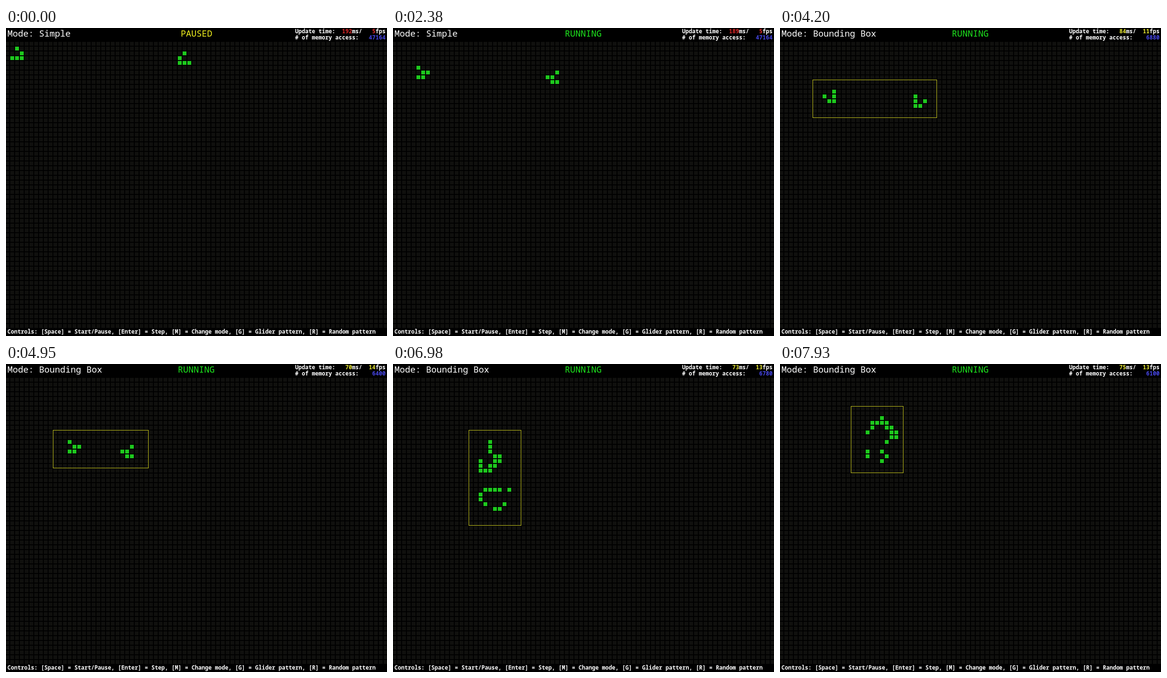
Recreate the animation shown at these times as an HTML page. Size 796 by 644 pixels, loop 8 s.

```html
<!DOCTYPE html>
<html lang="en">
<head>
<meta charset="utf-8">
<title>Game of Life</title>
<style>
  html, body { margin: 0; width: 100%; height: 100%; overflow: hidden; background: #000; }
  svg { display: block; }
  text { font-family: "Noto Sans Mono", "DejaVu Sans Mono", monospace; fill: #fff; white-space: pre; }
  .big { font-size: 18.333px; }
  .small { font-size: 11.667px; font-weight: 700; }
  .end { text-anchor: end; }
</style>
</head>
<body>
<svg width="796" height="644" viewBox="0 0 796 644">
  <defs>
    <pattern id="grid" x="-1" y="29" width="10" height="10" patternUnits="userSpaceOnUse">
      <rect width="8" height="8" fill="#10100e" shape-rendering="crispEdges"/>
    </pattern>
  </defs>
  <rect width="796" height="644" fill="#000"/>
  <rect y="29" width="796" height="598" fill="url(#grid)"/>
  <path id="cells" fill="#1ec81e" shape-rendering="crispEdges"/>
  <rect id="box" fill="none" stroke="#c8c81e"/>
  <text id="mode" class="big" x="3" y="18"></text>
  <text id="state" class="big" y="18"></text>
  <text class="small" x="604" y="11">Update time:</text>
  <text id="ms" class="small end" x="723" y="11"></text>
  <text class="small" x="723" y="11">ms/</text>
  <text id="fps" class="small end" x="772" y="11"></text>
  <text class="small" x="772" y="11">fps</text>
  <text class="small" x="604" y="24"># of memory access:</text>
  <text id="mem" class="small end" x="793" y="24" style="fill:#4646e6"></text>
  <text class="small" x="3" y="639">Controls: [Space] = Start/Pause, [Enter] = Step, [M] = Change mode, [G] = Glider pattern, [R] = Random pattern</text>
</svg>
<script>
const LOOP = 8000, COLS = 80, ROWS = 60, LAST = 101;
const RUN_AT = 370, FIRST_STEP = 500, SLOW = 134;
const BOX_AT = 3630, BOX_GEN = 24, FAST = 56.5;
const el = id => document.getElementById(id);

const cell = (x, y) => y * COLS + x;
const col = key => key % COLS;
const row = key => Math.floor(key / COLS);

function evolve(live) {
  const sums = new Map();
  for (const key of live) {
    for (let y = row(key) - 1; y <= row(key) + 1; y++) {
      for (let x = col(key) - 1; x <= col(key) + 1; x++) {
        if (x < 0 || y < 0 || x >= COLS || y >= ROWS) continue;
        sums.set(cell(x, y), (sums.get(cell(x, y)) || 0) + 1);
      }
    }
  }
  // Each sum includes the cell itself
  const alive = ([key, n]) => n === 3 || (n === 4 && live.has(key));
  return new Set([...sums].filter(alive).map(([key]) => key));
}

// Live area with a margin of two cells
function bounds(live) {
  const xs = [...live].map(col), ys = [...live].map(row);
  const x = Math.min(...xs) - 2, y = Math.min(...ys) - 2;
  return { x, y, w: Math.max(...xs) + 3 - x, h: Math.max(...ys) + 3 - y };
}

const outline = live => [...live]
  .map(key => `M${col(key) * 10 - 1} ${row(key) * 10 + 29}h8v8h-8z`).join("");

const glider = [[2, 1], [3, 2], [1, 3], [2, 3], [3, 3]];
const mirrored = glider.map(([x, y]) => [39 - x, y + 1]);
const gens = [];
let live = new Set([...glider, ...mirrored].map(([x, y]) => cell(x, y)));
while (gens.length <= LAST) {
  gens.push({ path: outline(live), area: bounds(live) });
  live = evolve(live);
}

function generation(t) {
  if (t < FIRST_STEP) return 0;
  if (t < BOX_AT) return Math.min(BOX_GEN - 1, 1 + Math.floor((t - FIRST_STEP) / SLOW));
  return Math.min(LAST, BOX_GEN + Math.floor((t - BOX_AT) / FAST));
}

// Small repeating jitter; the boxed mode starts slower and settles
function updateTime(t, g) {
  if (g >= BOX_GEN) return 70 + (3 * g + 6) % 7 + Math.max(0, 45 - g);
  const n = t < 170 ? 0 : g + 1;
  return 187 + (2 * n + 5) % 7;
}

function label(id, text, color) {
  el(id).textContent = text;
  if (color) el(id).style.fill = color;
}

function draw(t) {
  const g = generation(t), boxed = g >= BOX_GEN, running = t >= RUN_AT;
  const ms = updateTime(t, g), tint = boxed ? "#e6e632" : "#dc2828";
  const state = running ? "RUNNING" : "PAUSED";
  el("cells").setAttribute("d", gens[g].path);
  label("mode", "Mode: " + (boxed ? "Bounding Box" : "Simple"));
  label("state", state, running ? "#1ee61e" : "#f0f01e");
  el("state").setAttribute("x", Math.floor((796 - 11 * state.length) / 2));
  label("ms", ms, tint);
  label("fps", Math.floor(1000 / ms), tint);

  const box = el("box");
  box.style.display = boxed ? "" : "none";
  if (!boxed) {
    // Every neighbourhood inside the field is read, then every cell written
    label("mem", (3 * COLS - 2) * (3 * ROWS - 2) + COLS * ROWS);
    return;
  }
  // The box shows the region scanned for this step; the counter trails by one more
  const a = gens[g - 1].area, b = gens[g - 2].area;
  box.setAttribute("x", a.x * 10 - 1.5);
  box.setAttribute("y", a.y * 10 + 28.5);
  box.setAttribute("width", a.w * 10 - 1);
  box.setAttribute("height", a.h * 10 - 1);
  label("mem", COLS * ROWS + 10 * b.w * b.h);
}

const start = performance.now();
function tick() {
  draw((performance.now() - start) % LOOP);
  requestAnimationFrame(tick);
}
tick();
</script>
</body>
</html>
```
